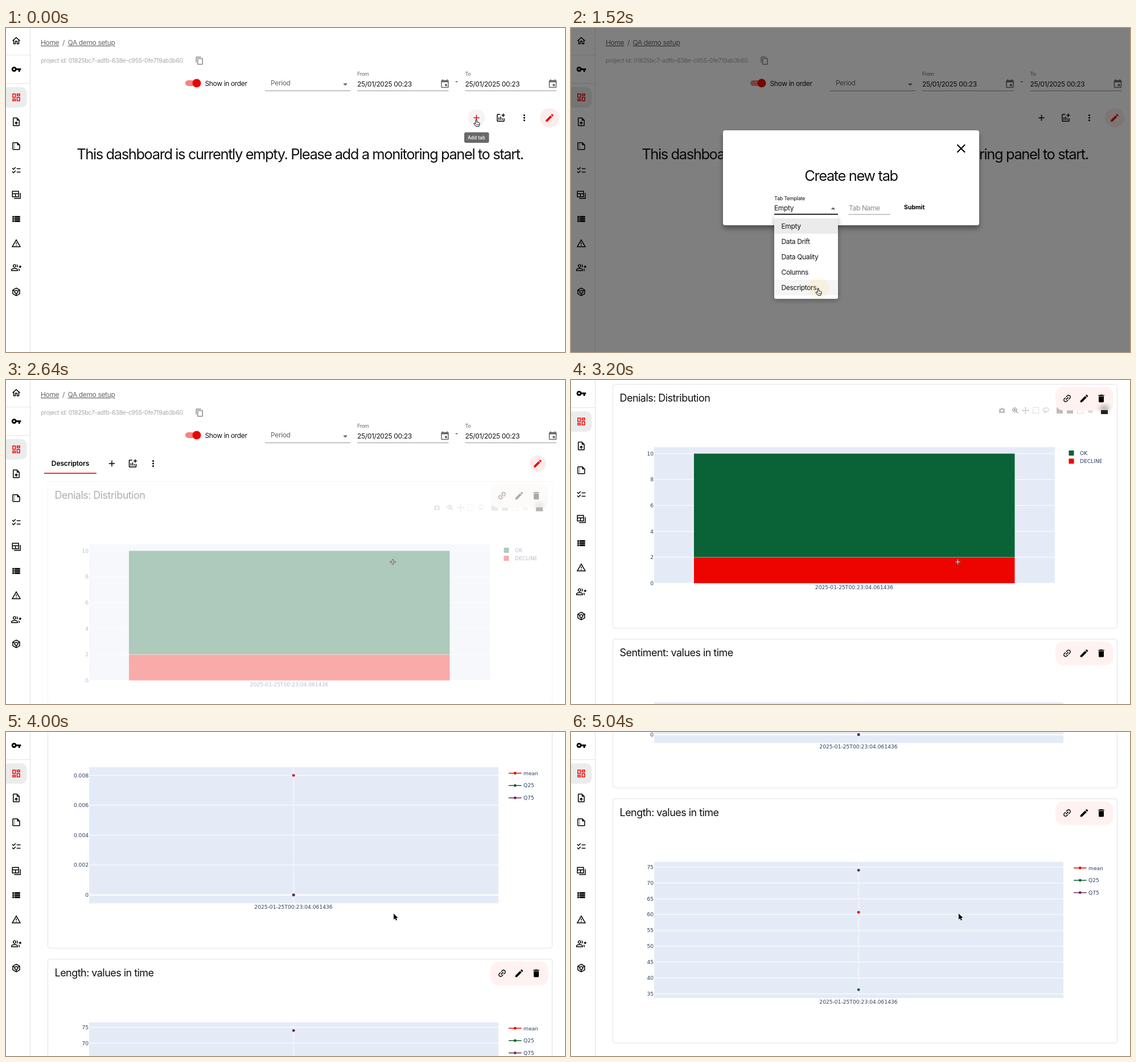
An HTML page that plays this animation: 982x570 px, repeating every 5.36 s.

```html
<!DOCTYPE html>
<html lang="en">
<head>
<meta charset="utf-8">
<title>Dashboard tab demo</title>
<style>
html, body { margin: 0; width: 100%; height: 100%; overflow: hidden; background: #fff; }
svg { display: block; width: 982px; height: 570px; }
text { font-family: Inter, sans-serif; font-optical-sizing: none; letter-spacing: -.03em; white-space: pre; }
.big { letter-spacing: -.0555em; }
.wide { letter-spacing: 0; }
.plot { font-family: "DejaVu Sans", Verdana, sans-serif; letter-spacing: 0; fill: #2a3f5f; }
.mid { text-anchor: middle; }
.end { text-anchor: end; }
.link { text-decoration: underline; }
</style>
</head>
<body>
<svg id="stage" viewBox="0 0 982 570"></svg>
<script>
const LOOP = 5360, STEP = 80;
const RED = '#ed0400', GREEN = '#0a6237', PURPLE = '#632a5c', GREY = '#666';

// 24 x 24 icon outlines; names in STROKED are drawn as lines
const ICONS = {
  home: 'M12 5.69l5 4.5V18h-2v-6H9v6H7v-7.81l5-4.5M12 3L2 12h3v8h6v-6h2v6h6v-8h3L12 3z',
  key: 'M12.65 10C11.83 7.67 9.61 6 7 6c-3.31 0-6 2.69-6 6s2.69 6 6 6c2.61 0 4.83-1.67 5.65-4H17v4h4v-4h2v-4H12.65zM7 14c-1.1 0-2-.9-2-2s.9-2 2-2 2 .9 2 2-.9 2-2 2z',
  board: 'M19 5v2h-4V5h4M9 5v6H5V5h4m10 8v6h-4v-6h4M9 17v2H5v-2h4M21 3h-8v6h8V3zM11 3H3v10h8V3zm10 8h-8v10h8V11zm-10 4H3v6h8v-6z',
  upload: 'M14 2H6c-1.1 0-1.99.9-1.99 2L4 20c0 1.1.89 2 1.99 2H18c1.1 0 2-.9 2-2V8l-6-6zm4 18H6V4h7v5h5v11zM8 15.01l1.41 1.41L11 14.84V19h2v-4.16l1.59 1.59L16 15.01 12.01 11 8 15.01z',
  report: 'M15 3H5c-1.1 0-1.99.9-1.99 2L3 19c0 1.1.89 2 1.99 2H19c1.1 0 2-.9 2-2V9l-6-6zM5 19V5h9v5h5v9H5zM9 8c0 .55-.45 1-1 1s-1-.45-1-1 .45-1 1-1 1 .45 1 1zm0 4c0 .55-.45 1-1 1s-1-.45-1-1 .45-1 1-1 1 .45 1 1zm0 4c0 .55-.45 1-1 1s-1-.45-1-1 .45-1 1-1 1 .45 1 1z',
  checks: 'M22 7h-9v2h9V7zm0 8h-9v2h9v-2zM5.54 11L2 7.46l1.41-1.41 2.12 2.12 4.24-4.24 1.41 1.41L5.54 11zm0 8L2 15.46l1.41-1.41 2.12 2.12 4.24-4.24 1.41 1.41L5.54 19z',
  tables: 'M3 4h14.5v13H3zM3 9.5h14.5M10.2 9.5V17M21.5 8v12.5H7',
  list: 'M3 14h4v-4H3v4zm0 5h4v-4H3v4zM3 9h4V5H3v4zm5 5h13v-4H8v4zm0 5h13v-4H8v4zM8 5v4h13V5H8z',
  warn: 'M12 5.99L19.53 19H4.47L12 5.99M12 2L1 21h22L12 2zm1 14h-2v2h2v-2zm0-6h-2v4h2v-4z',
  people: 'M22 9V7h-2v2h-2v2h2v2h2v-2h2V9zM8 12c2.21 0 4-1.79 4-4s-1.79-4-4-4-4 1.79-4 4 1.79 4 4 4zm0-6c1.1 0 2 .9 2 2s-.9 2-2 2-2-.9-2-2 .9-2 2-2zm0 7c-2.67 0-8 1.34-8 4v3h16v-3c0-2.66-5.33-4-8-4zm6 5H2v-.99C2.2 16.29 5.3 15 8 15s5.8 1.29 6 2v1zM12.51 4.05C13.43 5.11 14 6.49 14 8s-.57 2.89-1.49 3.95C14.47 11.7 16 10.04 16 8s-1.53-3.7-3.49-3.95zm4.02 9.78C17.42 14.66 18 15.7 18 17v3h2v-3c0-1.45-1.59-2.51-3.47-3.17z',
  cube: 'M12 3l8 4.5v9L12 21l-8-4.5v-9zM4 7.5l4.5 2.6M20 7.5l-4.5 2.6M12 21v-5M12 8.2l3.5 1.9v3.9L12 16l-3.5-2v-3.9z',
  copy: 'M16 1H4c-1.1 0-2 .9-2 2v14h2V3h12V1zm3 4H8c-1.1 0-2 .9-2 2v14c0 1.1.9 2 2 2h11c1.1 0 2-.9 2-2V7c0-1.1-.9-2-2-2zm0 16H8V7h11v14z',
  date: 'M17 12h-5v5h5v-5zM16 1v2H8V1H6v2H5c-1.11 0-1.99.9-1.99 2L3 19c0 1.1.89 2 2 2h14c1.1 0 2-.9 2-2V5c0-1.1-.9-2-2-2h-1V1h-2zm3 18H5V8h14v11z',
  plus: 'M19 13h-6v6h-2v-6H5v-2h6V5h2v6h6v2z',
  chart: 'M22 5v2h-3v3h-2V7h-3V5h3V2h2v3h3zm-3 14H5V5h6V3H5c-1.1 0-2 .9-2 2v14c0 1.1.9 2 2 2h14c1.1 0 2-.9 2-2v-6h-2v6zm-4-6v4h2v-4h-2zm-4 4h2V9h-2v8zm-2 0v-6H7v6h2z',
  more: 'M12 8c1.1 0 2-.9 2-2s-.9-2-2-2-2 .9-2 2 .9 2 2 2zm0 2c-1.1 0-2 .9-2 2s.9 2 2 2 2-.9 2-2-.9-2-2-2zm0 6c-1.1 0-2 .9-2 2s.9 2 2 2 2-.9 2-2-.9-2-2-2z',
  edit: 'M3 17.25V21h3.75L17.81 9.94l-3.75-3.75L3 17.25zM20.71 7.04c.39-.39.39-1.02 0-1.41l-2.34-2.34c-.39-.39-1.02-.39-1.41 0l-1.83 1.83 3.75 3.75 1.83-1.83z',
  link: 'M3.9 12c0-1.71 1.39-3.1 3.1-3.1h4V7H7c-2.76 0-5 2.24-5 5s2.24 5 5 5h4v-1.9H7c-1.71 0-3.1-1.39-3.1-3.1zM8 13h8v-2H8v2zm9-6h-4v1.9h4c1.71 0 3.1 1.39 3.1 3.1s-1.39 3.1-3.1 3.1h-4V17h4c2.76 0 5-2.24 5-5s-2.24-5-5-5z',
  bin: 'M6 19c0 1.1.9 2 2 2h8c1.1 0 2-.9 2-2V7H6v12zM19 4h-3.5l-1-1h-5l-1 1H5v2h14V4z',
  camera: 'M2 6h5l2-3h6l2 3h5v15H2zM12 9a4 4 0 1 0 .01 0z',
  zoom: 'M10 3a7 7 0 1 0 .01 0zM15 15l7 7M7 10h6M10 7v6',
  pan: 'M12 1v22M1 12h22M9 4l3-3 3 3M9 20l3 3 3-3M4 9l-3 3 3 3M20 9l3 3-3 3',
  select: 'M2 2h3M8 2h3M14 2h3M20 2h2v3M22 8v3M22 14v3M22 20v2h-3M16 22h-3M10 22H7M4 22H2v-3M2 16v-3M2 10V7',
  lasso: 'M7 17C-3 12 3 3 13 3s12 10 3 13-12 0-9-2 4 5 0 8',
  box: 'M1 1h22v22H1z'
};
const STROKED = ['tables', 'cube', 'zoom', 'pan', 'select', 'lasso'];
const SIDE = ['upload', 'report', 'checks', 'tables', 'list', 'warn', 'people', 'cube'];

const rect = (x, y, w, h, fill, more = '') =>
  `<rect x="${x}" y="${y}" width="${w}" height="${h}" fill="${fill}" ${more}/>`;
const dot = (x, y, r, fill) => `<circle cx="${x}" cy="${y}" r="${r}" fill="${fill}"/>`;
const path = (d, more) => `<path d="${d}" ${more}/>`;
const text = (x, y, s, size = 12, fill = '#111', cls = '', weight = 400) =>
  `<text x="${x}" y="${y}" font-size="${size}" fill="${fill}" class="${cls}" font-weight="${weight}">${s}</text>`;
const label = (x, y, s, cls = '') => text(x, y, s, 9.15, '', 'plot ' + cls);
const group = (body, more) => `<g ${more}>${body}</g>`;
const shift = (y, body) => group(body, `transform="translate(0 ${y})"`);
const fade = (o, body) => o > 0 ? group(body, `opacity="${o}"`) : '';
const icon = (name, x, y, size = 18, color = '#000', turn = 0) => path(ICONS[name],
  `transform="translate(${x} ${y}) rotate(${turn}) scale(${size / 24}) translate(-12 -12)" ` +
  (STROKED.includes(name) ? `fill="none" stroke="${color}" stroke-width="2"` : `fill="${color}" fill-rule="evenodd"`));

// Linear track through [time, ...values] points
function track(points, t) {
  let i = points.findIndex(p => p[0] > t);
  if (i < 0) return points[points.length - 1].slice(1);
  if (i === 0) return points[0].slice(1);
  const a = points[i - 1], b = points[i], k = (t - a[0]) / (b[0] - a[0]);
  return a.slice(1).map((v, n) => v + (b[n + 1] - v) * k);
}

const SCROLL = [[2960, 0], [3040, 45], [3200, 171], [3680, 488], [4320, 864], [4480, 932], [4640, 957], [5040, 958]];
const TIP = [[0, 1], [80, .4], [160, 0]];
const DIALOG = [[0, 0], [80, .35], [160, .8], [240, 1], [2240, 1], [2320, .6], [2400, .2], [2480, 0]];
const MENU = [[720, 0], [800, .4], [880, .85], [960, 1], [1520, 1], [1600, .5], [1680, 0]];
const PANELS = [[2480, 0], [2560, .12], [2640, .33], [2720, .7], [2800, 1]];
const POINTER = [[0, 827, 167], [320, 827, 167], [400, 620, 250], [480, 473, 311], [560, 473, 311],
  [720, 430, 317], [960, 428, 318], [1120, 380, 403], [1360, 435, 464], [1600, 435, 464],
  [1840, 600, 318], [1920, 603, 317], [2080, 682, 322], [2160, 681, 319.5]];

function sidebar() {
  return rect(0, 47, 42, 1, '#e4e4e4') + rect(0, 97, 42, 1, '#e4e4e4') +
    rect(-6, 104, 42.5, 36, '#ececec', 'rx="10"') +
    icon('home', 18, 22.5) + icon('key', 18, 72.5) + icon('board', 18, 122, 18, RED) +
    SIDE.map((name, i) => icon(name, 18, 165 + i * 42.75)).join('');
}

const dateField = (x, name) => text(x, 83.5, name, 9, GREY) + text(x, 103, '25/01/2025 00:23') +
  rect(x, 110, 160.5, 1, '#949494') + icon('date', x + 154, 98.5, 18, GREY);

function header() {
  return text(61, 30, 'Home', 12, GREY, 'link') + text(99, 30, '/', 12, GREY) +
    text(108.5, 30, 'QA demo setup', 12, GREY, 'link') +
    text(61, 60.5, 'project id: 01825bc7-adfb-638e-c955-0fe719ab3b60', 10.5, '#a8a8a8') +
    icon('copy', 340, 57.5, 15.5, '#777') +
    rect(315, 92, 25.5, 10, '#f68381', 'rx="5"') + dot(335, 97, 7.5, RED) +
    text(349.5, 101.5, 'Show in order') +
    text(465, 100.5, 'Period', 12, GREY) + rect(455, 110, 150, 1, '#949494') +
    path('M592 97.5h8l-4 4z', `fill="${GREY}"`) +
    dateField(617, 'From') + text(789, 98, '-') + dateField(806.5, 'To');
}

const tools = (xs, y, hot) => ['plus', 'chart', 'more'].map((name, i) =>
  icon(name, xs[i], y, 18, hot && !i ? RED : '#000')).join('');

function emptyPage(hot) {
  return (hot ? dot(826.5, 158, 15, '#f4f4f4') : '') + tools([826.5, 869, 910.5], 158, hot) +
    dot(955, 158, 17, '#fdecec') + icon('edit', 955, 158, 18, RED) +
    text(516.5, 230.5, 'This dashboard is currently empty. Please add a monitoring panel to start.', 25.5, '#111', 'big mid');
}

function tabBar() {
  return `<text x="113" y="151" font-size="12" font-weight="600" class="mid" style="letter-spacing:-.01em">Descriptors</text>` +
    rect(67, 163.3, 92, 1.6, RED) + tools([186, 222.5, 258.5], 147) +
    dot(934, 147, 14.5, '#fdecec') + icon('edit', 934, 147, 18, RED);
}

function modebar() {
  const marks = ['camera', 'zoom', 'pan', 'select', 'lasso', 'box', 'box', 'select', 'home'];
  const xs = [757, 780.5, 798.5, 816.5, 834.5, 858.5, 876.5, 894.5, 912.5];
  return marks.map((name, i) => icon(name, xs[i], 46.5, 12, i === 1 ? '#6b6b6b' : '#bdbdbd')).join('') +
    rect(931, 41, 12, 12, '#222');
}

function panel(top, title, chart, bar) {
  return shift(top, rect(73.5, .5, 886, 429.5, '#fff', 'rx="4" stroke="#e2e2e2"') +
    text(85.5, 30.5, title, 18, '#111') + (bar ? modebar() : '') +
    rect(851, 5, 101.5, 41.5, '#fff2f0', 'rx="14"') +
    (bar ? '<ellipse cx="937" cy="43" rx="8" ry="5" fill="#000" opacity=".35" filter="url(#soft)"/>' +
      rect(931, 46, 12, 6.5, '#222') : '') +
    icon('link', 871.5, 25.5, 18, '#000', -45) + icon('edit', 901.5, 25.5) + icon('bin', 931.5, 25.5) + chart);
}

function barChart() {
  const yOf = v => 350.5 - 22.8 * v, ticks = [0, 2, 4, 6, 8, 10];
  return rect(146, 111, 704, 239.5, '#e5ebf6') +
    ticks.map(v => rect(146, yOf(v) - .5, 704, 1, '#fff') + label(145, yOf(v) + 3.3, v, 'end')).join('') +
    rect(216, yOf(10), 563.5, 182.4, GREEN) + rect(216, yOf(2), 563.5, 45.6, RED) +
    rect(216, yOf(2) - .4, 563.5, .8, '#e5ebf6', 'opacity=".6"') +
    label(497.5, 360.7, '2025-01-25T00:23:04.061436', 'mid') +
    [['OK', GREEN], ['DECLINE', RED]].map(([s, c], i) =>
      rect(874.5, 117 + i * 14.3, 9, 9, c) + label(894, 124.9 + i * 14.3, s)).join('');
}

function timeChart(ticks, first, gap, dots) {
  return rect(146, 111.5, 719, 239.5, '#e5ebf6') + rect(504.9, 111.5, .8, 239.5, '#fff') +
    ticks.map((v, i) => {
      const y = first + i * gap, h = v === 0 ? 2 : 1;
      return rect(146, y - h / 2, 719, h, '#fff') + label(145, y + 3.3, v, 'end');
    }).join('') +
    dots.map(([y, c]) => dot(505.2, y, 2.4, c)).join('') +
    label(505, 361, '2025-01-25T00:23:04.061436', 'mid') +
    [['mean', RED], ['Q25', GREEN], ['Q75', PURPLE]].map(([s, c], i) => {
      const y = 122.2 + i * 21.7;
      return rect(883, y - .75, 22.5, 1.5, c) + dot(894.3, y, 2.4, c) + label(909, y + 3.3, s);
    }).join('');
}

function panels(bar) {
  const tens = Array.from({ length: 9 }, (_, i) => 75 - i * 5);
  return panel(178, 'Denials: Distribution', barChart(), bar) +
    panel(626.3, 'Sentiment: values in time', timeChart([0.008, 0.006, 0.004, 0.002, 0], 126, 52.6,
      [[126, RED], [336.4, GREEN], [336.4, PURPLE]])) +
    panel(1075, 'Length: values in time', timeChart(tens, 120.6, 27.86,
      [[200.2, RED], [336.4, GREEN], [126.2, PURPLE]]));
}

function dialog(t) {
  const open = t >= 720 && t < 1600;
  return rect(0, 0, 982, 570, '#000', 'opacity=".5"') +
    rect(267, 186, 450, 167, '#000', 'rx="4" opacity=".35" filter="url(#soft)"') +
    rect(267, 180, 450, 167, '#fff', 'rx="4"') +
    path('M678.5 205.2l13.6 13.6m0-13.6l-13.6 13.6', 'stroke="#000" stroke-width="2.2"') +
    text(492, 268.5, 'Create new tab', 25.5, '#111', 'big mid') +
    text(357, 302.5, 'Tab Template', 9, t < 720 ? GREY : '#111') +
    text(357, 320.5, t < 1600 ? 'Empty' : 'Descriptors') +
    path(open ? 'M456.5 319.3h8l-4-4z' : 'M456.5 315.3h8l-4 4z', `fill="${GREY}"`) +
    (t < 720 ? rect(357, 327.3, 112, 1, '#949494') : rect(357, 326.8, 112, 1.7, '#000')) +
    text(488, 321, 'Tab Name', 12, '#8a8a8a') + rect(487.5, 327.5, 73.5, 1, '#949494') +
    text(585, 319, 'Submit', 10.5, '#000', 'wide', 700);
}

function menu(t, tipY) {
  const hover = Math.floor((tipY - 335) / 27);
  const stretch = t < 960 ? .56 + .44 * track(MENU, t)[0] : 1;
  const rows = ['Empty', 'Data Drift', 'Data Quality', 'Columns', 'Descriptors'].map((s, i) =>
    rect(357, 335 + i * 27, 112, 27, !i ? '#ebebeb' : i === hover ? '#f5f5f5' : '#fff') +
    text(369.5, 353 + i * 27, s)).join('');
  return group(rect(357, 333, 112, 146, '#000', 'rx="3" opacity=".3" filter="url(#soft)"') +
    rect(357, 329, 112, 147.5, '#fff', 'rx="3"') + rows,
    `transform="translate(0 ${329 * (1 - stretch)}) scale(1 ${stretch})"`);
}

const CURSORS = {
  hand: path('M-2-5c0-1.6 2.2-1.6 2.2 0v3.6l3.6.7c1 .2 1.4.8 1.3 1.8l-.6 3.2-.8 1.9h-5l-3.6-4.4c-.7-1 .5-1.9 1.4-1.2l1.5 1.2z',
    'fill="#fff" stroke="#000" stroke-width="1" stroke-linejoin="round"') +
    path('M-.2 2.2v2M1.5 2.2v2M3.1 2.2v2', 'stroke="#000" stroke-width=".7"'),
  arrow: path('M0 0v10.4l2.4-2.1 1.7 3.8 1.9-.8-1.7-3.7h3.3z',
    'fill="#000" stroke="#fff" stroke-width=".9" paint-order="stroke"'),
  cross: path('M-1.5 -4.5v10M-6.5 .5h10', 'stroke="#333" stroke-width="2.4"') +
    path('M-1.5 -4v9M-6 .5h9', 'stroke="#fff" stroke-width="1"')
};

function cursorKind(t, scroll) {
  if (t < 160) return 'hand';
  if (t < 640) return 'arrow';
  if (t < 1680) return 'hand';
  if (t >= 1840 && t < 2000) return 'hand';
  return t >= 2560 && scroll < 208 ? 'cross' : 'arrow';
}

function scene(t) {
  const [scroll] = track(SCROLL, t), [x, y] = track(POINTER, t);
  const tabbed = t >= 2400;
  const clicked = t === 720 || t === 1520 || t === 1600 || t === 1920;
  return '<defs><filter id="soft" x="-50%" y="-50%" width="200%" height="200%"><feGaussianBlur stdDeviation="4"/></filter></defs>' +
    rect(0, 0, 982, 570, '#fff') +
    shift(-scroll, header() + (tabbed ? tabBar() : emptyPage(t < 80)) +
      fade(track(PANELS, t)[0], panels(scroll < 288))) +
    rect(42, 0, 1, 570, '#e0e0e0') + shift(-Math.min(scroll, 49), sidebar()) +
    fade(track(TIP, t)[0], rect(805, 183.5, 43.5, 18.5, '#686868', 'rx="3"') +
      text(826.5, 195.8, 'Add tab', 8.25, '#fff', 'wide mid', 500)) +
    fade(track(DIALOG, t)[0], dialog(t)) +
    fade(track(MENU, t)[0], menu(t, y - 5)) +
    (clicked ? `<circle cx="${x}" cy="${y - 6}" r="18" fill="#ffc83c" opacity=".12"/>` : '') +
    group(CURSORS[cursorKind(t, scroll)], `transform="translate(${x} ${y})"`);
}

const stage = document.getElementById('stage');
const start = performance.now();
let shown = -1;
function tick() {
  const t = Math.floor((performance.now() - start) % LOOP / STEP) * STEP;
  if (t !== shown) stage.innerHTML = scene(shown = t);
  requestAnimationFrame(tick);
}
tick();
</script>
</body>
</html>
```
